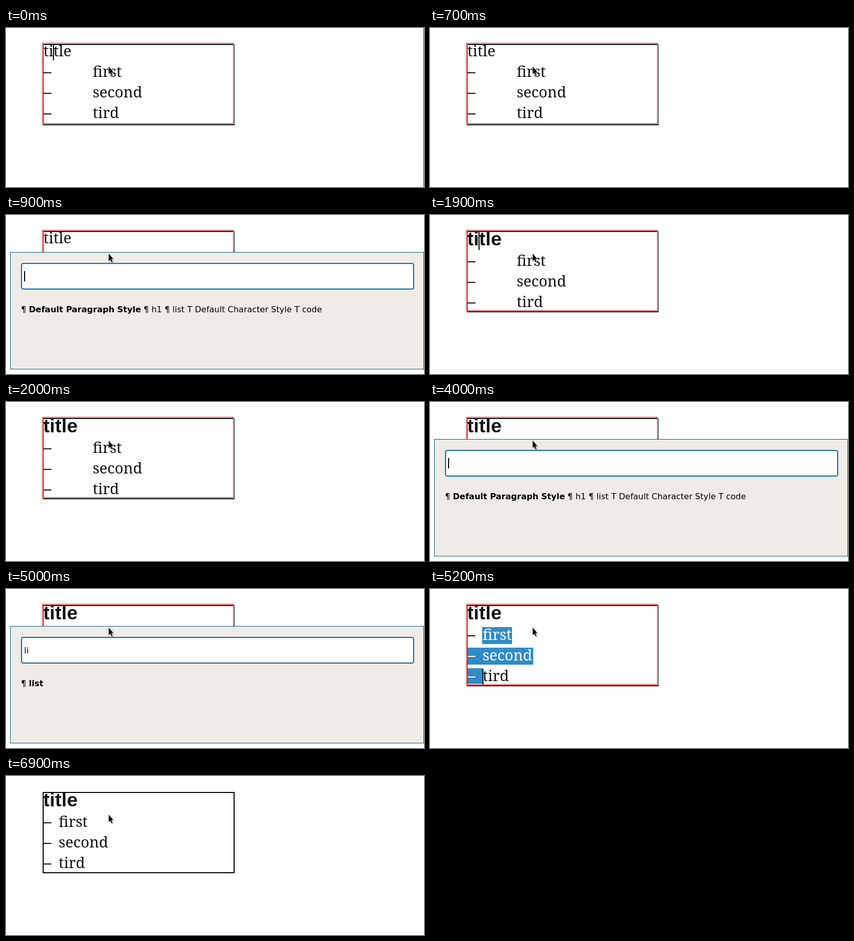
An HTML page with a canvas that plays this animation: 810x309 px, repeating every 8000 ms.

```html
<!DOCTYPE html>
<html>
<head>
<meta charset="utf-8">
<style>
html, body { margin: 0; width: 100%; height: 100%; overflow: hidden; background: #fff; }
canvas { display: block; }
</style>
</head>
<body>
<canvas id="stage" width="810" height="309"></canvas>
<script>
const ctx = document.getElementById('stage').getContext('2d');
const LOOP = 8000;
const INK = '#141414', HIGHLIGHT = '#308cc6';
const SERIF = '29px "Noto Serif", serif';
const HEADING = 'bold 37.6px "Liberation Sans", sans-serif';
const UI = '16px "DejaVu Sans", sans-serif';
const ITEMS = ['first', 'second', 'tird'];

const within = (t, ...spans) => spans.some(([from, to]) => t >= from && t < to);

function rect(x, y, w, h, color) {
  ctx.fillStyle = color;
  ctx.fillRect(x, y, w, h);
}

function outline(x, y, w, h, color) {
  ctx.strokeStyle = color;
  ctx.lineWidth = 1;
  ctx.strokeRect(x + 0.5, y + 0.5, w - 1, h - 1);
}

function text(str, x, y, font, color) {
  ctx.font = font;
  ctx.fillStyle = color;
  ctx.fillText(str, x, y);
  return x + ctx.measureText(str).width;
}

function drawFrame(t) {
  rect(71, 31, 372, 158, '#000');
  rect(73, 33, 368, 154, '#fff');
  if (t >= 6400) return;
  outline(71, 30, 371, 157, '#fff');
  outline(70, 29, 371, 157, '#f00');
}

function drawDocument(t) {
  const styled = t >= 1900;
  const indent = t >= 5200 ? 102 : 168;
  const shift = styled ? 4 : 0;
  const selected = within(t, [3300, 6400]) ? 2 : within(t, [3100, 3300]) ? 1 : 0;
  const ends = [57, 98];

  if (styled) text('title', 72, 59, HEADING, INK);
  else text('title', 72.5, 55, SERIF, INK);

  ITEMS.forEach((item, i) => {
    const top = 70 + shift + 40 * i;
    const inDash = i > 0 && i <= selected;
    const inText = i < selected;
    if (inDash) rect(73, top, indent - 73, i === 2 ? 30 : 33, HIGHLIGHT);
    if (inText) rect(indent - 1, top, ends[i] + 1, 33, HIGHLIGHT);
    rect(73, top + 16, 15, 2, inDash ? '#fff' : INK);
    text(item, indent, top + 25, SERIF, inText ? '#fff' : INK);
  });

  if (within(t, [0, 100], [400, 700], [1300, 1900])) rect(91, 32, 2, 31, '#000');
  if (within(t, [1900, 2000])) rect(94, 32, 2, 36, '#000');
  if (within(t, [2700, 5500], [6100, 6400])) rect(indent - 0.5, 75 + 40 * selected, 2, 31, '#000');
}

function drawHandles() {
  for (const x of [66, 251, 436]) {
    for (const y of [25, 103, 181]) {
      if (x === 251 && y === 103) continue;
      rect(x, y, 9, 9, '#4f9a2e');
      rect(x + 1, y + 1, 7, 7, '#8fe066');
    }
  }
}

function roundBox(x, y, w, h, r, color) {
  ctx.fillStyle = color;
  ctx.beginPath();
  ctx.roundRect(x, y, w, h, r);
  ctx.fill();
}

function drawDialog(t) {
  const query = within(t, [1300, 1600]) ? 'h' : within(t, [1600, 1900]) ? 'h1' : t >= 4400 ? 'li' : '';
  const styles = [['¶', 'Default Paragraph Style'], ['¶', 'h1'], ['¶', 'list'],
    ['T', 'Default Character Style'], ['T', 'code']];

  rect(8, 72, 802, 228, '#00557f');
  rect(9, 73, 800, 226, '#efebe7');
  roundBox(29, 93, 762, 52, 4.5, '#196fa3');
  roundBox(31, 95, 758, 48, 2.5, '#d3e5f1');
  roundBox(32, 96, 756, 46, 2, '#fff');

  const end = text(query, 35, 125, UI, '#000');
  if (t < 5000) rect(Math.round(end), 109, 2, 20, '#000');

  let x = 29;
  styles.filter(([, name]) => name.toLowerCase().includes(query)).forEach(([mark, name], i) => {
    x = text(mark + ' ', x, 189, UI, '#000');
    x = text(name, x, 189, i ? UI : 'bold ' + UI, '#000');
    x = text(' ', x, 189, UI, '#000');
  });
}

function drawPointer() {
  const arrow = new Path2D('M199 75V89.5L202 86.7L204.6 92L206.5 91.2L204.2 85.8H208Z');
  ctx.save();
  ctx.shadowColor = 'rgba(0,0,0,.35)';
  ctx.shadowBlur = 2;
  ctx.shadowOffsetX = ctx.shadowOffsetY = 1;
  ctx.lineWidth = 1.5;
  ctx.strokeStyle = '#fff';
  ctx.stroke(arrow);
  ctx.restore();
  ctx.fillStyle = '#000';
  ctx.fill(arrow);
}

function draw(now) {
  const t = now % LOOP;
  rect(0, 0, 810, 309, '#fff');
  drawFrame(t);
  drawDocument(t);
  if (t < 400) rect(809, 0, 1, 309, '#333');
  if (within(t, [6400, 6900])) drawHandles();
  if (within(t, [900, 1900], [4000, 5200])) drawDialog(t);
  drawPointer();
  requestAnimationFrame(draw);
}
requestAnimationFrame(draw);
</script>
</body>
</html>
```
